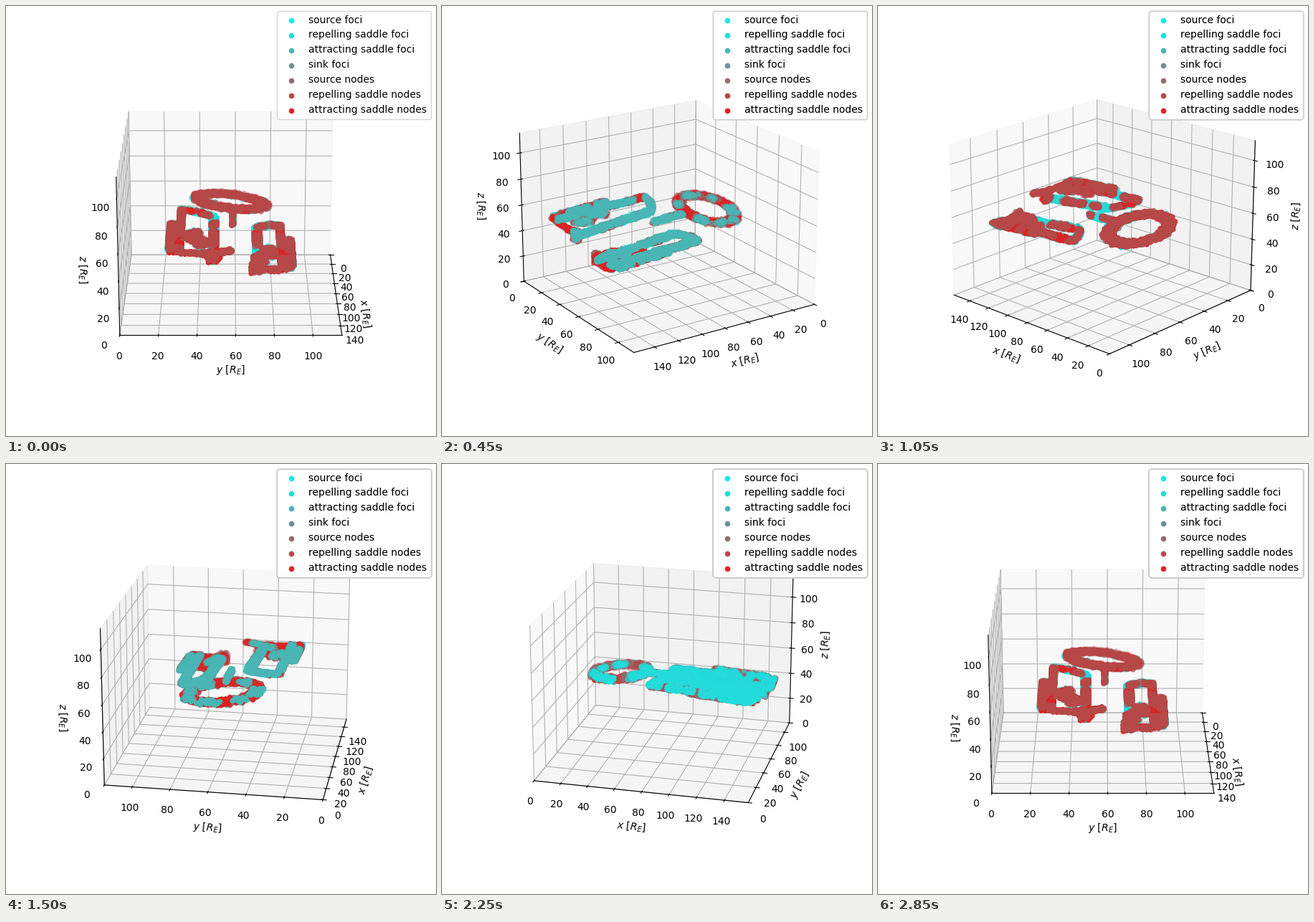
A matplotlib script for the animation above (3000 ms loop, 600 px wide and 600 px high).

```python
import numpy as np
import matplotlib.pyplot as plt
from matplotlib.animation import FuncAnimation

FRAMES = 20
MID = 57.5
rng = np.random.default_rng(4)

NAMES = ["source foci", "repelling saddle foci", "attracting saddle foci",
         "sink foci", "source nodes", "repelling saddle nodes",
         "attracting saddle nodes"]
WEIGHTS = (.2, 1, 1, .3, .6, 1, 1)   # how common each class is
u = np.linspace(0, 1, 25)


def path(x, y, z):
    return np.column_stack(np.broadcast_arrays(x, y, z, u)[:3])


def ring():
    c, s = np.cos(2 * np.pi * u), np.sin(2 * np.pi * u)
    return path(43 + 18.8 * c, MID + 18.5 * s, 58.5 - 3 * s + c)


def lobe(side):
    """Parts of one lobe: path, jitter, share of foci."""
    inner = 11.5 + 2.5 * side
    front, tail = 57 - 6 * side, 54 - 6 * side

    def at(x, off, z):
        return path(x, MID + side * off, z)

    return [
        (at(75 + 10 * u**2, 26.5 + (inner - 26.5) * u, front + 2 * side * u),
         (1.2, 1.2, 1), .85),
        (at(76 + 74 * u, 26.5, front - 3 * u), (1, 1.5, 1.2), .65),
        (at(105 + 45 * u, 31, front - 3 * u), (1, 1.5, 1.2), .6),
        (at(85 + 65 * u, inner, front + 2 * side - 7 * u),
         (1, 1.6, 1.2), .8),
        (at(118 + 25 * u, 18 + 4 * np.sin(6 * u), tail + 1),
         (4, 2.5, 1), .55),
        (at(151, 31 + (7 * side - 24) * u, tail - 2 * np.sin(np.pi * u)),
         (.7, .8, .7), .35),
        (at(149, inner + 6 * u - 3, tail - 3 + 2 * side),
         (1, 1, 4), .35),
    ]


PARTS = [(ring(), (2.8, 2.8, 1.2), .25),
         (path(65 + 26 * u, MID + 1, 59 - u), (1, .8, 1.2), .7),
         *lobe(-1), *lobe(1)]


def strew(way, jitter, cover):
    """Scatter points along a path, in clumps that fill a share of it."""
    steps = np.linalg.norm(np.diff(way, axis=0), axis=1)
    dist = np.r_[0, np.cumsum(steps)]
    length = dist[-1]
    s = rng.uniform(0, length, int(length * 7) + 20)
    clumps = max(4, int(length / 3))
    chosen = rng.random(clumps) < cover
    s = s[chosen[(s / length * clumps).astype(int).clip(0, clumps - 1)]]
    pts = np.column_stack([np.interp(s, dist, axis) for axis in way.T])
    return np.round(pts + rng.uniform(-1, 1, pts.shape) * jitter)


fig = plt.figure(figsize=(6, 6), dpi=100)
ax = fig.add_subplot(111, projection="3d", computed_zorder=False)

clouds = []
for k, name in enumerate(NAMES):
    red = max(k, .6) / 7
    pts = np.vstack([
        strew(way, jitter, WEIGHTS[k] * (foci if k < 4 else 1.1 - foci))
        for way, jitter, foci in PARTS])
    clouds.append(ax.scatter(*pts.T, color=(red, 1 - red, 1 - red),
                             label=name))

ax.set(xlim=(0, 157), ylim=(0, 115), zlim=(0, 115),
       xlabel="$x$ [$R_E$]", ylabel="$y$ [$R_E$]", zlabel="$z$ [$R_E$]")

# One more legend is laid on top with every step
legends = [fig.legend(handles=clouds) for _ in range(FRAMES)]


def layers(azim):
    """Draw order from bottom to top: each side brings two classes forward."""
    side = round(azim / 60) % 6
    top = [0, 1] if side == 5 else [6, 2] if side % 2 else [6, 5]
    return [k for k in (6, 3, 2, 0, 1, 5, 4) if k not in top] + top


def update(i):
    azim = 360 * i / (FRAMES - 1)
    ax.view_init(elev=20, azim=azim)
    for z, k in enumerate(layers(azim)):
        clouds[k].set_zorder(10 + z)
    for n, legend in enumerate(legends):
        legend.set_visible(n <= i)
    return clouds


anim = FuncAnimation(fig, update, frames=FRAMES, interval=150, repeat=True)
plt.show()
```
